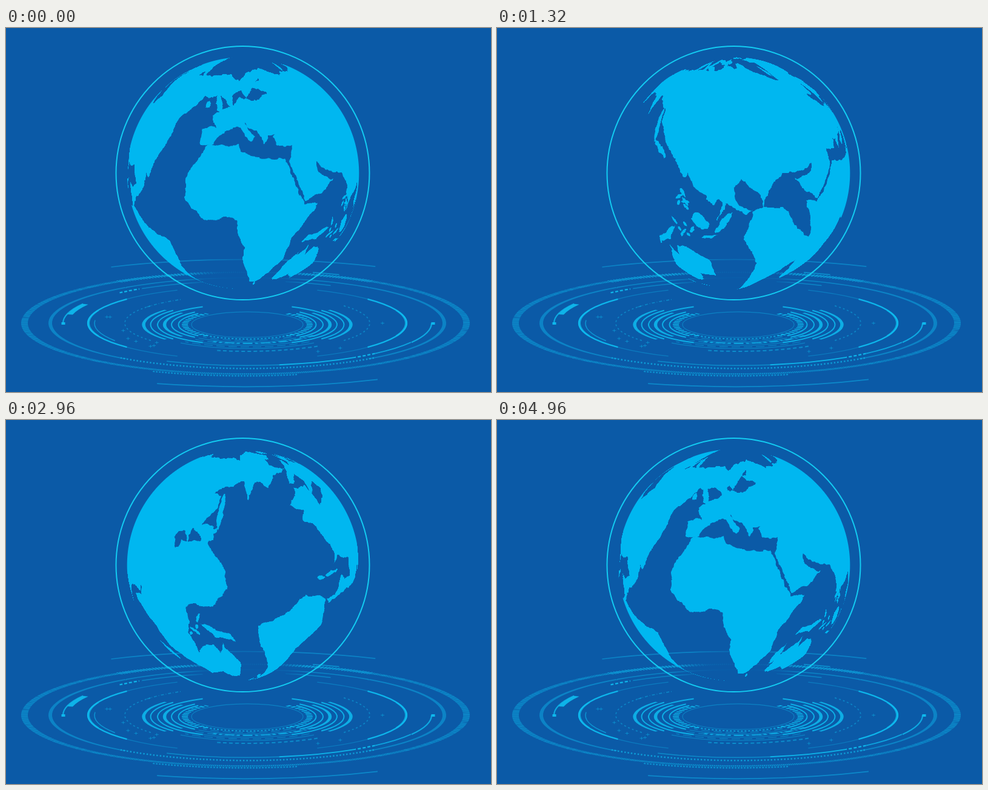
These frames come from a looping animation (800x600 px, 5000 ms). An HTML page with a canvas:

```html
<!DOCTYPE html>
<html lang="en">
<head>
<meta charset="utf-8">
<title>Rotating globe</title>
<style>
html, body { margin: 0; width: 100%; height: 100%; overflow: hidden; background: #0b5aa7; }
canvas { position: absolute; left: 0; top: 0; }
#globe { left: 198px; top: 46px; }
</style>
</head>
<body>
<canvas id="base" width="800" height="600"></canvas>
<canvas id="globe" width="386" height="387"></canvas>
<script>
const TAU = Math.PI * 2, RAD = Math.PI / 180;
const CYAN = '#0fbdf0';

let seed = 7;
const rand = () => (seed = (seed * 16807) % 2147483647) / 2147483647;
const between = (a, b) => a + (b - a) * rand();

// ---------- platform ----------
const base = document.getElementById('base').getContext('2d');
const FLAT = 0.23;

// Angles in degrees, clockwise from the right. Wide strokes are flattened with the ellipse.
function arc(r, from, to, width, alpha, dash = [], flat = FLAT) {
  base.save();
  base.strokeStyle = CYAN;
  base.globalAlpha = alpha;
  base.lineWidth = width;
  base.setLineDash(dash);
  base.translate(r > 350 ? 395 : 398, r < 180 ? 489 : 486.5);
  base.beginPath();
  if (width > 2.5) {
    base.scale(1, flat);
    base.arc(0, 0, r, from * RAD, to * RAD);
  } else {
    base.ellipse(0, 0, r, r * flat, 0, from * RAD, to * RAD);
  }
  base.stroke();
  base.restore();
}

// The same arc on the right and on the left.
function pair(r, half, ...style) {
  arc(r, -half, half, ...style);
  arc(r, 180 - half, 180 + half, ...style);
}

function dot(x, y, w, h, alpha) {
  base.globalAlpha = alpha;
  base.fillStyle = CYAN;
  base.fillRect(x - w / 2, y - h / 2, w, h);
  base.globalAlpha = 1;
}

function drawPlatform() {
  // Outermost lines
  arc(472, 242, 297, 1.7, 0.42, [], 0.222);
  arc(472, 62.5, 108, 1.8, 0.48, [], 0.222);
  arc(378, 77, 114, 2.2, 0.55, [3, 2]);
  arc(380, 287, 294, 1.8, 0.55);

  // Hatched rim
  arc(364.5, 0, 360, 11, 0.58, [2, 1.2]);
  for (const from of [235, 278]) arc(364, from, from + 27, 17, 0.6, [2.5, 3]);

  // Plain ring, dotted in front
  pair(325, 52, 6, 0.42);
  arc(325, 232, 308, 1.6, 0.45);
  arc(325, 50, 130, 2.5, 0.65, [2.5, 3]);

  // Two trailing strokes with square heads
  for (const a of [0, 180]) {
    arc(304, a, a + 27, 2.2, 0.8);
    arc(303, a + 27, a + 46, 1.8, a ? 0 : 0.75);
    arc(303, a + 46, a + 54, 2.3, 0.9, [5, 3]);
    dot(399.5 + 305 * Math.cos(a * RAD), 487, 6, 4, 0.95);
  }
  arc(299, 192, 207, 9, 0.9);
  arc(303, 54, 80, 2, 0.9);
  arc(303, 80, 116, 1.5, 0.5);
  arc(303, 235, 256, 1.5, 0.45);
  arc(303, 282, 297, 1.5, 0.45);

  // Brackets
  pair(263, 41, 2.3, 0.9);
  pair(262, 20, 4, 0.75);
  pair(263, 64, 1.3, 0.35);
  arc(252, 150, 185, 1.5, 0.6);

  // Dashes
  pair(202, 38, 1.7, 0.45, [3, 4]);
  arc(202, 55, 105, 2, 0.5, [6, 4]);
  arc(202, 215, 238, 1.6, 0.45, [5, 3, 1, 3]);

  // Dense core
  for (let i = 0; i < 6; i++) {
    const r = 171 - 11.5 * i, wide = i % 3 === 0;
    pair(r, wide ? 38 : between(40, 62), wide ? 5.5 : 2, 0.85);
    arc(r, 50, 130, 1.3, 0.4, i % 2 ? [14, 6] : []);
  }
  arc(134, 35, 115, 8, 0.75, [16, 5, 5, 4]);
  pair(103, 50, 10, 0.9, [6, 5]);
  arc(103, 45, 135, 2, 0.7, [3, 3]);
  arc(92, 0, 360, 1.2, 0.4);

  // Little crosses
  for (let i = 0; i < 11; i++) {
    const a = between(-30, 210) * RAD, r = between(200, 245);
    const x = 398 + r * Math.cos(a), y = 487 + r * FLAT * Math.sin(a);
    dot(x, y, 6, 1, 0.45);
    dot(x, y, 1, 5, 0.45);
  }

  // Lines die out below the globe.
  base.save();
  base.globalCompositeOperation = 'destination-out';
  base.translate(395, 418);
  base.scale(1, 0.46);
  const fade = base.createRadialGradient(0, 0, 30, 0, 0, 105);
  fade.addColorStop(0, 'rgba(0,0,0,.9)');
  fade.addColorStop(0.5, 'rgba(0,0,0,.75)');
  fade.addColorStop(1, 'rgba(0,0,0,0)');
  base.fillStyle = fade;
  base.fillRect(-130, -130, 260, 260);
  base.restore();

  base.strokeStyle = '#13cbf1';
  base.lineWidth = 2;
  base.beginPath();
  base.arc(390.5, 239, 209, 0, TAU);
  base.stroke();
}

// ---------- world map ----------
const PER_DEG = 4, MAP_W = 360 * PER_DEG, MAP_H = 180 * PER_DEG;
const sheet = document.createElement('canvas');
sheet.width = MAP_W;
sheet.height = MAP_H;
const map = sheet.getContext('2d', { willReadFrequently: true });
map.fillStyle = '#fff';

// Latitude on the globe: the map is stretched to reach both poles.
const stretch = lat => -27.2 + 1.095 * lat + 0.0069 * Math.max(0, lat - 31) ** 2;

// Midpoint displacement roughens a coast; long sides stay near their chord.
function coast(out, x0, y0, x1, y1) {
  const dx = x1 - x0, dy = y1 - y0, len = Math.hypot(dx, dy);
  if (len < 0.8) { out.push([x1, y1]); return; }
  const k = len > 18 ? 0 : between(-0.15, 0.15) * Math.min(1, 5 / len);
  const mx = (x0 + x1) / 2 - dy * k, my = (y0 + y1) / 2 + dx * k;
  coast(out, x0, y0, mx, my);
  coast(out, mx, my, x1, y1);
}

// A few key points as longitude, latitude pairs.
function land(...p) {
  const pts = [], n = p.length;
  for (let i = 0; i < n; i += 2) coast(pts, p[i], p[i + 1], p[(i + 2) % n], p[(i + 3) % n]);
  for (const turn of [-360, 0, 360]) {
    map.beginPath();
    for (const [lon, lat] of pts) {
      map.lineTo((lon + 180 + turn) * PER_DEG, (90 - stretch(lat)) * PER_DEG);
    }
    map.fill();
  }
}

// A rough oval: centre, length, width, slope in degrees.
function isle(lon, lat, long, wide, slope = 0) {
  const p = [], c = Math.cos(slope * RAD), s = Math.sin(slope * RAD);
  for (let i = 0; i < 8; i++) {
    const a = i / 8 * TAU, k = between(0.4, 0.6);
    const x = long * k * Math.cos(a), y = wide * k * Math.sin(a);
    p.push(lon + x * c - y * s, lat + x * s + y * c);
  }
  land(...p);
}

function islands(n, west, east, south, north, size) {
  for (let i = 0; i < n; i++) {
    isle(between(west, east), between(south, north), size * between(0.6, 1.6), size * 0.4, between(-60, 60));
  }
}

function drawMap() {
  // Africa
  land(-6,36, 10,37, 11,34, 20,31, 32,31, 37,20, 43,11.5, 51,12, 40,-4, 40,-16, 35,-23, 27,-34,
    19,-35, 12,-17, 13,-9, 9,0, 9,4.3, 5,6, -8,4.4, -17,14.7, -16,22, -10,30);
  isle(47, -19, 14, 5, 70);
  // Europe
  land(60,69, 41,66, 28,71, 15,68, 5,61, 8,58, 11,59, 14,55.5, 18,60, 24,65.7, 22,60.5, 30,60, 60,58);
  land(30,60, 24,57, 20,54.6, 10,56, 8,53.5, -4,48.5, -1.5,43.5, -9,43, -9,37, -3,36.5, 3,42,
    9,44, 15.5,38, 18,40, 13,45.5, 19,42, 22,36.6, 24,40.5, 62,42, 62,60);
  isle(-2, 54, 9, 4, 110);
  isle(-8, 53, 3, 3);
  isle(-19, 65, 9, 2.5);
  // Asia
  land(38,50, 26.5,40, 28,36.5, 36,36.5, 34,29.5, 43,13, 52,16, 60,22.5, 50,25.5, 49,30, 57,26,
    67,25, 73,19, 77,8, 80,15, 90,22, 95,16, 98.5,14, 99,7, 104,1.3, 100,9, 101,13, 105,9,
    109,12, 106,19, 110,22, 112,50);
  land(108,21.5, 116,23, 122,29, 119,38, 125,39.5, 127,34.5, 129,40, 141,48, 142,53, 137,54,
    155,59.5, 157,51, 163,59, 190,66, 160,70, 113,74, 103,77, 72,73, 58,69, 58,46, 106,46);
  isle(55, 73, 9, 3, 45);
  isle(137, 36, 13, 3, 40);
  isle(143, 47, 14, 2.5, 85);
  // South-east Asia
  isle(100, 0, 16, 4, -45);
  isle(114, 1, 12, 8, 45);
  isle(110, -7.5, 11, 1.5, -8);
  islands(6, 119, 126, 6, 18, 4);
  islands(8, 119, 131, -9, 2, 4);
  land(131,-1, 147,-6, 150,-10.5, 138,-8);
  // Australia, New Zealand
  land(114,-23, 129,-13, 136,-12, 139,-17.5, 142,-11, 153,-26, 150,-37.5, 140,-38, 133,-32, 116,-35);
  isle(176, -38, 7, 3, -50);
  isle(170, -44, 8, 3, 40);
  // North America
  land(-168,66, -156,71, -128,70, -95,68, -92,72, -82,69, -94,59, -80,52, -77,61, -65,60, -56,52,
    -65,50, -62,45.5, -70,43, -76,36, -81,31, -80,25.5, -84,30, -97,28, -115,31, -124,42, -126,49,
    -140,60, -152,60, -162,55, -160,60);
  land(-94,30, -97,20, -91,18.5, -87,21, -84,11, -77,9, -80,7, -104,18, -108,25, -110,23, -117,33);
  isle(-79, 21.5, 11, 1.6, -15);
  isle(-71, 19, 5, 2);
  // Arctic
  isle(-74, 68, 25, 6, -30);
  isle(-78, 81, 24, 4);
  islands(12, -124, -84, 70, 78, 8);
  land(-73,78, -35,83.5, -20,79, -24,69, -44,60, -53,67, -58,75.5);
  // South America
  land(-77,8.5, -62,10.5, -50,0, -35,-6, -39,-18, -48,-27, -58,-37, -69,-51, -66,-55, -73,-52,
    -73,-38, -70,-19, -81,-5);
}

// ---------- globe ----------
const globe = document.getElementById('globe').getContext('2d');
const SIZE_W = 386, SIZE_H = 387, R = 191.3, CX = 193, CY = 193.3;
const DIST = 14, LENS = R * Math.sqrt(DIST * DIST - 1);
const ROW = MAP_W * 2;

drawPlatform();
drawMap();

// Mask repeated twice side by side so that turning needs no wrap.
const mask = new Uint8Array(ROW * MAP_H);
const texels = map.getImageData(0, 0, MAP_W, MAP_H).data;
for (let y = 0; y < MAP_H; y++) {
  for (let x = 0; x < MAP_W; x++) {
    mask[y * ROW + x] = mask[y * ROW + x + MAP_W] = texels[(y * MAP_W + x) * 4 + 3];
  }
}

const image = globe.createImageData(SIZE_W, SIZE_H);
const cells = [];

function texel(u, v, t) {
  const lat = Math.asin(Math.max(-1, Math.min(1, v * t))) / RAD;
  const lon = Math.atan2(u * t, DIST - t) / RAD;
  const row = Math.min(MAP_H - 1, Math.floor((90 - lat) * PER_DEG));
  return row * ROW + Math.floor((lon + 360) * PER_DEG) % MAP_W;
}

// Each pixel looks through the glass ball: near and far wall.
for (let y = 0; y < SIZE_H; y++) {
  for (let x = 0; x < SIZE_W; x++) {
    const dx = x + 0.5 - CX, dy = CY - y - 0.5, r = Math.hypot(dx, dy);
    const cover = Math.min(1, R + 0.5 - r);
    if (cover <= 0) continue;
    const fit = Math.min(1, (R - 0.05) / r) / LENS, u = dx * fit, v = dy * fit;
    const q = 1 + u * u + v * v;
    const root = Math.sqrt(Math.max(0, DIST * DIST - q * (DIST * DIST - 1)));
    const i = (y * SIZE_W + x) * 4;
    image.data.set([0, 183, 240], i);
    cells.push({ i: i + 3, cover, near: texel(u, v, (DIST - root) / q), far: texel(u, v, (DIST + root) / q) });
  }
}

const LOOP = 5000, STEP = 40;
let shown = -1;

function frame(now) {
  const t = Math.floor(now % LOOP / STEP) * STEP;
  if (t === shown) return;
  shown = t;
  const lon = 12 - 360 * t / LOOP - 4.5 * Math.sin(Math.PI * t / LOOP);
  const shift = Math.round((lon + 900) % 360 * PER_DEG) % MAP_W;
  for (const c of cells) {
    image.data[c.i] = Math.max(mask[c.near + shift], mask[c.far + shift]) * c.cover;
  }
  globe.putImageData(image, 0, 0);
}

const start = performance.now();
(function tick() {
  frame(performance.now() - start);
  requestAnimationFrame(tick);
})();
</script>
</body>
</html>
```
